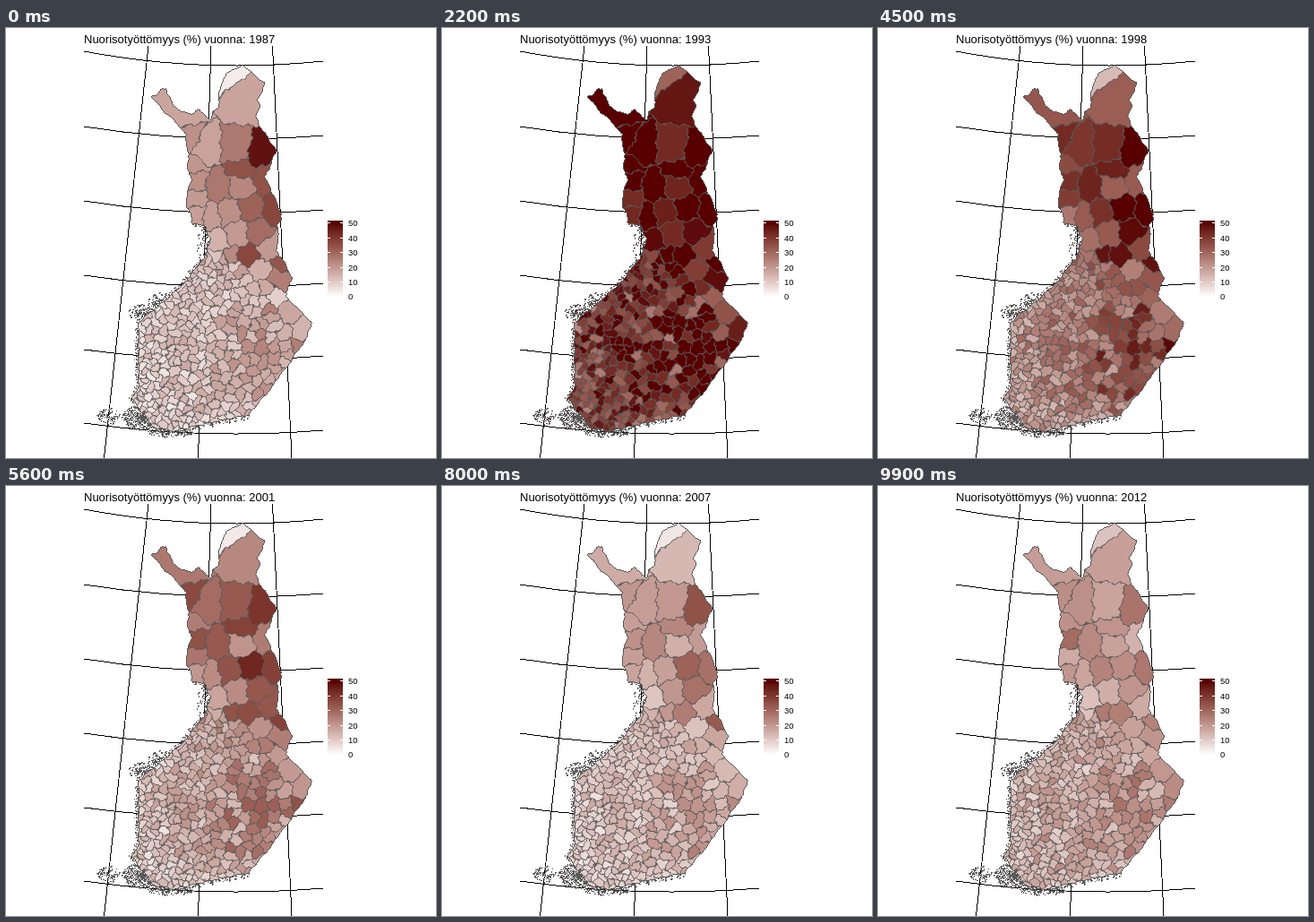
An HTML page with a canvas that plays this animation: 480 by 480 pixels, repeating every 10000 ms.

```html
<!DOCTYPE html>
<html lang="fi">
<head>
<meta charset="utf-8">
<title>Nuorisotyöttömyys</title>
<style>
html, body { margin: 0; width: 100%; height: 100%; overflow: hidden; background: #fff; }
svg, canvas { position: absolute; left: 0; top: 0; width: 480px; height: 480px; }
text { font-family: "Liberation Sans", Arial, sans-serif; fill: #000; }
.grid { fill: none; stroke: #000; stroke-width: 1; shape-rendering: crispEdges; }
</style>
</head>
<body>
<svg viewBox="0 0 480 480">
  <g class="grid">
    <path d="M87 26Q220 51 354 37M87 110Q220 131 354 120M87 193Q220 214 354 203"/>
    <path d="M87 276Q220 296 354 285M87 359Q220 377 354 366M87 441Q220 460 354 449"/>
    <path d="M159 20L109.500 480M229 20L214.500 480M297.500 20L319 480"/>
  </g>
  <text x="87" y="17" font-size="13">Nuorisotyöttömyys (%) vuonna: <tspan id="year">1987</tspan></text>
  <g id="scale" font-size="9.500"></g>
</svg>
<canvas id="map" width="480" height="480"></canvas>
<script>
const SIZE = 480, SEA = -1, SHORE = -2;
const ctx = document.getElementById('map').getContext('2d');
const yearLabel = document.getElementById('year');
const clamp = (v, lo = 0, hi = 1) => Math.min(hi, Math.max(lo, v));
const mix = (a, b, u) => a + (b - a) * u;
const points = text => text.split(' ').map(p => p.split(',').map(Number));

let seed = 1987;
function rand() {
  seed = (seed + 0x6D2B79F5) | 0;
  let t = Math.imul(seed ^ (seed >>> 15), 1 | seed);
  t = (t + Math.imul(t ^ (t >>> 7), 61 | t)) ^ t;
  return ((t ^ (t >>> 14)) >>> 0) / 4294967296;
}

// White to dark red, blended in Lab space
function shade(value) {
  const u = clamp(value / 50);
  const cube = f => f > 0.2069 ? f ** 3 : (f - 0.13793) / 7.787;
  const fy = (116 - 84.1 * u) / 116;
  const X = 0.9505 * cube(fy + 36.8 * u / 500);
  const Y = cube(fy);
  const Z = 1.089 * cube(fy - 24.7 * u / 200);
  const gamma = c => Math.round(255 * clamp(c <= 0.0031 ? 12.92 * c : 1.055 * c ** (1 / 2.4) - 0.055));
  return [
    gamma(3.2406 * X - 1.5372 * Y - 0.4986 * Z),
    gamma(-0.9689 * X + 1.8758 * Y + 0.0415 * Z),
    gamma(0.0557 * X - 0.204 * Y + 1.057 * Z)
  ];
}
const GREY = 89;
const palette = Array.from({ length: 501 }, (_, i) => shade(i / 10));
const colour = v => palette[Math.round(clamp(v, 0, 50) * 10)];

// Country outline, clockwise from the north-western tip
const arctic = '161,76 169,73 171,68 178,67 186,84 196,93 206,95 213,90 222,96 227,101 231,93 237,88 236,77 240,60 247,48 255,46 264,40 271,47 288,60';
const east = '286,71 280,81 284,88 279,97 281,105 302,137 289,166 304,198 308,214 303,219 304,240 301,247 309,258 319,279 312,298 325,312 341,328 336,345 313,378 286,414 271,430';
const coast = '271,432 243,437 214,444 188,450 165,446 150,428 140,412 147,401 147,375 147,330 153,322 178,303 201,281 223,251 227,235 222,222 207,217';
const river = '206,209 201,199 200,188 206,169 201,152 204,140 200,132 200,118 188,104 179,97 168,83';
const outline = points([arctic, east, coast, river].join(' '));

function inside(poly, x, y) {
  let hit = false;
  for (let i = 0, j = poly.length - 1; i < poly.length; j = i++) {
    const [ax, ay] = poly[i], [bx, by] = poly[j];
    if (ay > y !== by > y && x < (bx - ax) * (y - ay) / (by - ay) + ax) hit = !hit;
  }
  return hit;
}

// 0 by the sea, 1 inland, 2 along the north-eastern border
function inland(x, y) {
  const shore = y > 330 ? 147 : 148 + (330 - y) * 0.94;
  return clamp((x - shore) / 125 - Math.max(0, (y - 405) / 80));
}
function remoteness(x, y) {
  const lapland = 0.8 + Math.abs(x - 222) / 45 - Math.max(0, (115 - y) / 50);
  return mix(inland(x, y), clamp(lapland, 0, 2), clamp((300 - y) / 60));
}

// Percent by remoteness 0, 1 and 2 at each turning point
const TREND = [
  { step: 0, level: [8, 17, 36] },
  { step: 12, level: [5, 12, 26] },
  { step: 22, level: [37, 49, 58] },
  { step: 28, level: [37, 49, 58] },
  { step: 35, level: [26, 43, 56] },
  { step: 56, level: [10, 24, 38] },
  { step: 70, level: [11, 20, 33] },
  { step: 83, level: [9, 16, 26] },
  { step: 89, level: [13, 21, 26] },
  { step: 99, level: [13, 20, 23] }
];

const seats = [];
function addSeat(x, y, large) {
  const r = remoteness(x, y), bias = rand() - 0.5;
  const track = TREND.map(({ level: [sea, mid, far] }) => {
    const base = r < 1 ? mix(sea, mid, r) : mix(mid, far, r - 1);
    return base + (base + 4) * (0.55 * bias + 0.35 * (rand() - 0.5));
  });
  seats.push({ x, y, large, track });
}

// Large northern municipalities, then small ones that crowd towards the sea
const northern = '242,46 268,80 195,90 218,136 261,136 279,140 290,168 264,158 262,175 236,177 202,128 207,150 210,172 210,190 212,208 229,210 247,206 274,202 299,202 257,229 280,226 296,246 268,256 305,280 282,270 315,317 330,338 236,238';
for (const [x, y] of points(northern)) addSeat(x, y, true);
for (let i = 0; i < 7000; i++) {
  const x = mix(138, 345, rand()), y = mix(240, 455, rand());
  const gap = (6 + 5 * inland(x, y)) * mix(0.7, 1.3, rand());
  if (!inside(outline, x, y)) continue;
  if (seats.every(s => Math.hypot(s.x - x, s.y - y) > (s.large ? 19 : gap))) addSeat(x, y, false);
}

// Nearest seat, and how much of the pixel its border covers
function locate(x, y) {
  let id = 0, rival = 0, d1 = Infinity, d2 = Infinity;
  seats.forEach((s, i) => {
    const d = (s.x - x) ** 2 + (s.y - y) ** 2;
    if (d < d1) { d2 = d1; rival = id; d1 = d; id = i; }
    else if (d < d2) { d2 = d; rival = i; }
  });
  const a = seats[id], b = seats[rival];
  const reach = (d2 - d1) / (2 * Math.hypot(a.x - b.x, a.y - b.y));
  return { id, line: clamp(1.05 - reach) };
}

// Bend coordinates slightly so that boundaries meander
const bend = (x, y, a) => [
  x + a * Math.sin(y * 0.9 + Math.sin(x * 0.37) * 2) + 2 * a * Math.sin(y * 0.33 + x * 0.12),
  y + a * Math.sin(x * 0.8 + Math.sin(y * 0.41) * 2) + 2 * a * Math.sin(x * 0.37 - y * 0.1)
];
const map = new Int16Array(SIZE * SIZE).fill(SEA);
const lines = new Float32Array(SIZE * SIZE);
for (let y = 36; y < 456; y++) {
  for (let x = 136; x < 345; x++) {
    if (!inside(outline, ...bend(x, y, 0.3))) continue;
    const { id, line } = locate(...bend(x, y, 0.7));
    map[y * SIZE + x] = id;
    lines[y * SIZE + x] = line;
  }
}
map.slice().forEach((id, i, land) => {
  if (id !== SEA && [1, -1, SIZE, -SIZE].some(d => land[i + d] === SEA)) map[i] = SHORE;
});

// Islets: mostly shoreline, with a little land showing
function islet(x, y) {
  const at = Math.round(y) * SIZE + Math.round(x);
  if (map[at] !== SEA) return;
  map[at] = rand() < 0.12 ? locate(x, y).id : SHORE;
  if (rand() < 0.6) map[at + 1] = SHORE;
  if (rand() < 0.4) map[at + SIZE] = SHORE;
}
function archipelago(cx, cy, rx, ry, count) {
  while (count--) {
    const angle = rand() * 2 * Math.PI, r = rand() ** 0.7;
    islet(cx + rx * r * Math.cos(angle), cy + ry * r * Math.sin(angle));
  }
}
archipelago(114, 433, 13, 9, 110);
archipelago(150, 434, 21, 14, 520);
archipelago(182, 450, 28, 6, 180);
archipelago(151, 317, 15, 9, 150);
archipelago(172, 304, 14, 9, 90);
archipelago(219, 234, 9, 20, 50);

const shoreline = points(coast);
for (let i = 1; i < shoreline.length; i++) {
  const [ax, ay] = shoreline[i - 1], [bx, by] = shoreline[i];
  for (let n = 2 * Math.hypot(bx - ax, by - ay); n > 0; n--) {
    const u = rand();
    islet(mix(ax, bx, u) + (rand() - rand()) * 5, mix(ay, by, u) + (rand() - rand()) * 5);
  }
}

const image = ctx.createImageData(SIZE, SIZE);
function paint(i, rgb, line = 0) {
  for (let c = 0; c < 3; c++) image.data[i * 4 + c] = mix(rgb[c], GREY, line);
  image.data[i * 4 + 3] = 255;
}
const filled = [];
map.forEach((id, i) => {
  if (id === SHORE) paint(i, [GREY, GREY, GREY]);
  else if (id !== SEA) filled.push(i);
});

// Legend bar, white ticks and labels
const LEGEND = { x: 359, top: 215, bottom: 302, zero: 299.4, unit: 1.64 };
for (let y = LEGEND.top; y < LEGEND.bottom; y++) {
  for (let x = 0; x < 17; x++) paint(y * SIZE + LEGEND.x + x, colour((LEGEND.zero - y) / LEGEND.unit));
}
let labels = '';
for (let v = 0; v <= 50; v += 10) {
  const y = Math.round(LEGEND.zero - v * LEGEND.unit);
  for (const x of [0, 1, 2, 14, 15, 16]) paint(y * SIZE + LEGEND.x + x, [255, 255, 255]);
  labels += `<text x="382" y="${y + 4}">${v}</text>`;
}
document.getElementById('scale').innerHTML = labels;

function draw(step) {
  const k = Math.max(1, TREND.findIndex(t => t.step >= step));
  const from = TREND[k - 1].step, to = TREND[k].step;
  const u = (step - from) / (to - from);
  const fills = seats.map(({ track }) => colour(mix(track[k - 1], track[k], u)));
  for (const i of filled) paint(i, fills[map[i]], lines[i]);
  ctx.putImageData(image, 0, 0);
  yearLabel.textContent = Math.round(mix(1987, 2012, step / 99));
}

let start, shown = 0;
function tick(now) {
  start ??= now;
  const step = Math.floor((now - start) % 10000 / 100);
  if (step !== shown) draw(shown = step);
  requestAnimationFrame(tick);
}
draw(0);
requestAnimationFrame(tick);
</script>
</body>
</html>
```
